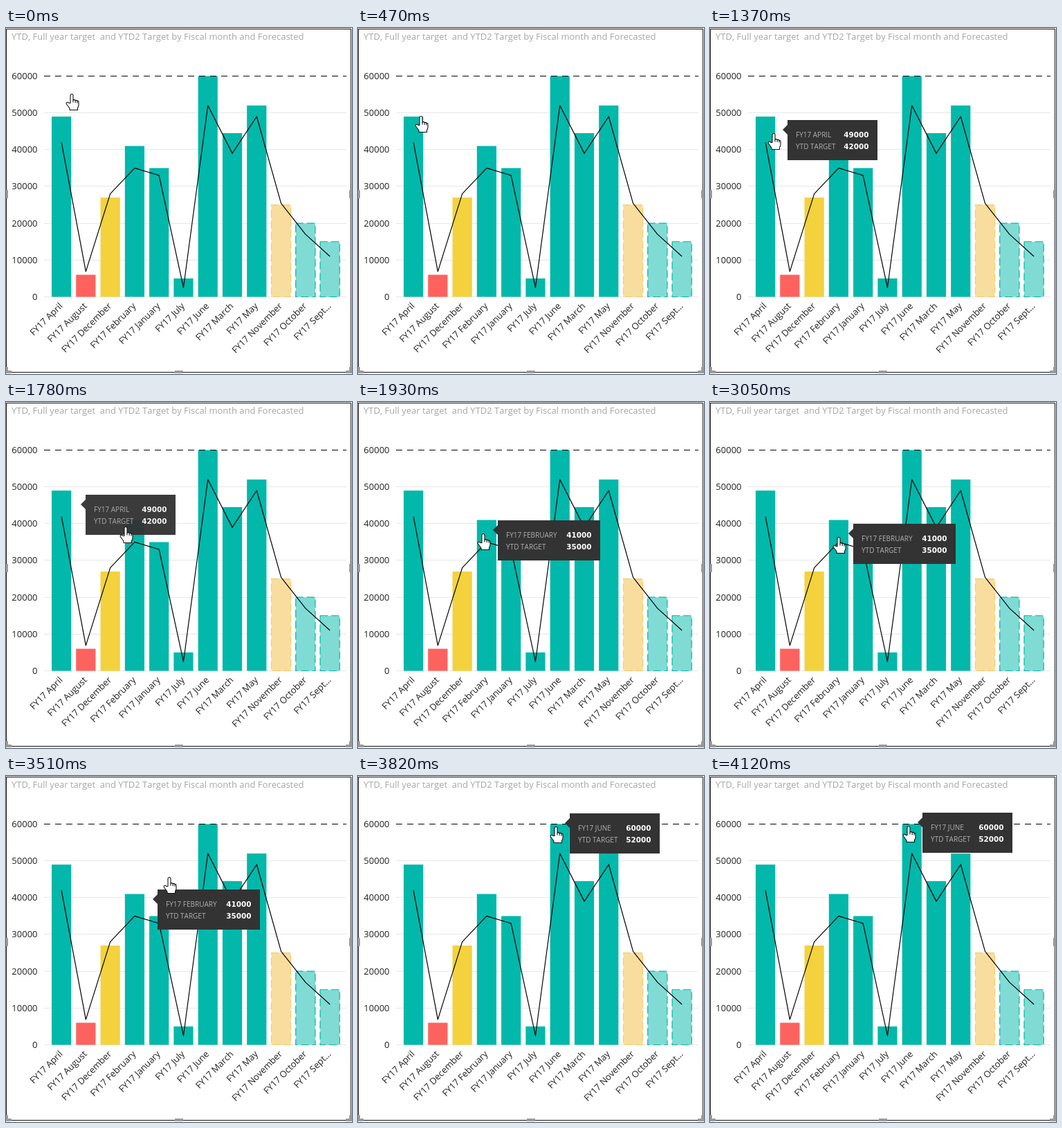
An HTML page with a canvas that plays this animation: 500x500 px, repeating every 5140 ms.

```html
<!DOCTYPE html>
<html lang="en">
<head>
<meta charset="utf-8">
<title>Fiscal month chart</title>
<style>
  html, body { margin: 0; width: 100%; height: 100%; overflow: hidden; background: #fff; }
  canvas { display: block; }
</style>
</head>
<body>
<canvas id="stage" width="500" height="500"></canvas>
<script>
const ctx = document.getElementById('stage').getContext('2d');
ctx.fontKerning = 'none';
const LOOP = 5140;
const SANS = '"Open Sans", "Noto Sans", sans-serif';
const TEAL = '#01b8aa', RED = '#fd625e', YELLOW = '#f4d23e';

// name, value, target, colour, paler fill for forecasts
const MONTHS = [
  ['April', 49000, 42000, TEAL],
  ['August', 6000, 6900, RED],
  ['December', 27000, 28000, YELLOW],
  ['February', 41000, 35000, TEAL],
  ['January', 35000, 33000, TEAL],
  ['July', 5000, 2500, TEAL],
  ['June', 60000, 52000, TEAL],
  ['March', 44500, 39000, TEAL],
  ['May', 52000, 49000, TEAL],
  ['November', 25000, 25400, '#f4ce63', '#f9dd9f'],
  ['October', 20000, 17000, TEAL, '#80dbd4'],
  ['Sept...', 15000, 11000, TEAL, '#80dbd4']
];
const BAR = 28.2, STEP = 35.27, LEFT = 66, BASE = 388.5;
const barX = i => LEFT + i * STEP;
const midX = i => barX(i) + BAR / 2;
const valueY = v => BASE - v * 0.005317;

// time, x, y of the pointer tip
const PATH = [
  [215, 95, 95], [330, 91, 106], [470, 91, 127], [560, 89, 144], [630, 90.5, 150.4],
  [1365, 90.5, 150.4], [1370, 91.9, 152.4], [1420, 94.1, 153.6], [1480, 106, 157],
  [1620, 138, 168], [1780, 173, 180], [1880, 179.6, 188.5], [1930, 181, 190],
  [2060, 186.6, 195], [3045, 186.6, 195], [3050, 186, 195], [3305, 186, 195],
  [3380, 198.8, 183.5], [3510, 236, 146], [3660, 264, 106], [3820, 285.6, 73.5],
  [3880, 286.6, 72]
];

// month index, start, end, length of the closing fade
const TIPS = [
  [0, 880, 1850, 90], [3, 1880, 1990, 40], [3, 2210, 3800, 90], [6, 3820, LOOP, 0]
];

const clamp = (v, lo, hi) => Math.min(hi, Math.max(lo, v));

function pointerAt(t) {
  const next = PATH.findIndex(p => p[0] > t);
  if (next === 0) return PATH[0].slice(1);
  if (next < 0) return PATH[PATH.length - 1].slice(1);
  const a = PATH[next - 1], b = PATH[next];
  const k = (t - a[0]) / (b[0] - a[0]);
  return [a[1] + (b[1] - a[1]) * k, a[2] + (b[2] - a[2]) * k];
}

function rect(color, x, y, w, h) {
  ctx.fillStyle = color;
  ctx.fillRect(x, y, w, h);
}

function text(str, x, y, font, color, align = 'left') {
  ctx.font = font;
  ctx.fillStyle = color;
  ctx.textAlign = align;
  ctx.fillText(str, x, y);
}

function hline(y, color, dash = []) {
  ctx.strokeStyle = color;
  ctx.lineWidth = 1;
  ctx.setLineDash(dash);
  ctx.beginPath();
  ctx.moveTo(55, y);
  ctx.lineTo(492, y);
  ctx.stroke();
  ctx.setLineDash([]);
}

function drawFrame() {
  ctx.strokeStyle = '#111';
  ctx.lineWidth = 1;
  ctx.strokeRect(0.5, 1.5, 498, 496);
  const grip = (...box) => rect('#999', ...box);
  grip(0, 234, 3, 12);
  grip(496, 234, 4, 12);
  grip(244, 495, 12, 4);
  grip(0, 490, 3, 9);
  grip(0, 495, 8, 4);
  grip(496, 490, 4, 9);
  grip(491, 495, 9, 4);
}

function drawBar([, value, , color, pale], i) {
  const x = barX(i), y = valueY(value), h = BASE - y;
  rect(pale || color, x, y, BAR, h);
  if (!pale) return;
  ctx.strokeStyle = color;
  ctx.lineWidth = 1.2;
  ctx.setLineDash([11, 5]);
  ctx.strokeRect(x, y, BAR, h);
  ctx.setLineDash([]);
}

function drawChart() {
  rect('#fff', 0, 0, 500, 500);
  drawFrame();
  text('YTD, Full year target  and YTD2 Target by Fiscal month and Forecasted',
    8, 17, '13px ' + SANS, '#a6a6a6');

  for (let v = 0; v <= 60000; v += 10000) {
    const y = valueY(v);
    if (v < 60000) hline(Math.floor(y) + 0.5, '#e6e6e6');
    text(v, 45.5, y + 4.5, '13px ' + SANS, '#222', 'right');
  }

  MONTHS.forEach(drawBar);
  hline(69.5, '#000', [9, 7]);

  ctx.strokeStyle = '#000';
  ctx.lineWidth = 1.2;
  ctx.lineJoin = 'round';
  ctx.beginPath();
  MONTHS.forEach((m, i) => ctx.lineTo(midX(i), valueY(m[2])));
  ctx.stroke();

  MONTHS.forEach(([name], i) => {
    ctx.save();
    ctx.translate(midX(i) + 2.5, 402.5);
    ctx.rotate(-Math.PI / 4);
    text('FY17 ' + name, 0, 0, '13px ' + SANS, '#222', 'right');
    ctx.restore();
  });
}

// The box follows the pointer until it leaves the bar.
function tipSpot(i, start, t) {
  const right = barX(i) + BAR;
  let [px, py] = pointerAt(t);
  if (px > right) {
    for (let s = start; s < t; s += 5) {
      const [x, y] = pointerAt(s);
      if (x > right) break;
      [px, py] = [x, y];
    }
  }
  return [Math.round(px + 20.5), Math.round(py - 19.5)];
}

function drawTip([i, start, end, fade], t) {
  if (t < start || t >= end) return;
  const [name, value, target] = MONTHS[i];
  const [x, y] = tipSpot(i, start, t);
  const w = name.length > 6 ? 148 : 130;
  ctx.save();
  if (fade) ctx.globalAlpha = clamp((end - t) / (fade * 0.8), 0, 1);
  rect('#333', x, y, w, 58);
  ctx.beginPath();
  ctx.moveTo(x, y + 7);
  ctx.lineTo(x - 7, y + 14);
  ctx.lineTo(x, y + 21);
  ctx.fill();
  const rows = [['FY17 ' + name.toUpperCase(), value], ['YTD TARGET', target]];
  rows.forEach(([label, num], r) => {
    const base = y + 25 + r * 17;
    text(label, x + 12, base, '10px ' + SANS, '#b0b0b0');
    text(num, x + w - 12.5, base, 'bold 10.4px "DejaVu Sans", sans-serif', '#fff', 'right');
  });
  ctx.restore();
}

const HAND = new Path2D('M-2 13V2a2 2 0 0 1 4 0V8.5q2-1 3.2.6q2-.8 2.8.8q2-.4 2 2V16' +
  'q0 2-1.5 4V23H-3V20.5L-7.5 14.5q-1-1.8.5-2.6q1.5-.6 3 1z');
const KNUCKLES = new Path2D('M2 8.5V12M5.2 9.1V12.5M8 9.9V13');

function drawPointer(t) {
  const [x, y] = pointerAt(t);
  ctx.save();
  ctx.translate(Math.round(x), Math.round(y) + 0.5);
  ctx.fillStyle = '#fff';
  ctx.strokeStyle = '#111';
  ctx.lineWidth = 1.1;
  ctx.fill(HAND);
  ctx.stroke(HAND);
  ctx.stroke(KNUCKLES);
  ctx.restore();
}

const began = performance.now();

function tick() {
  const t = (performance.now() - began) % LOOP;
  drawChart();
  TIPS.forEach(tip => drawTip(tip, t));
  drawPointer(t);
  requestAnimationFrame(tick);
}
tick();
</script>
</body>
</html>
```
